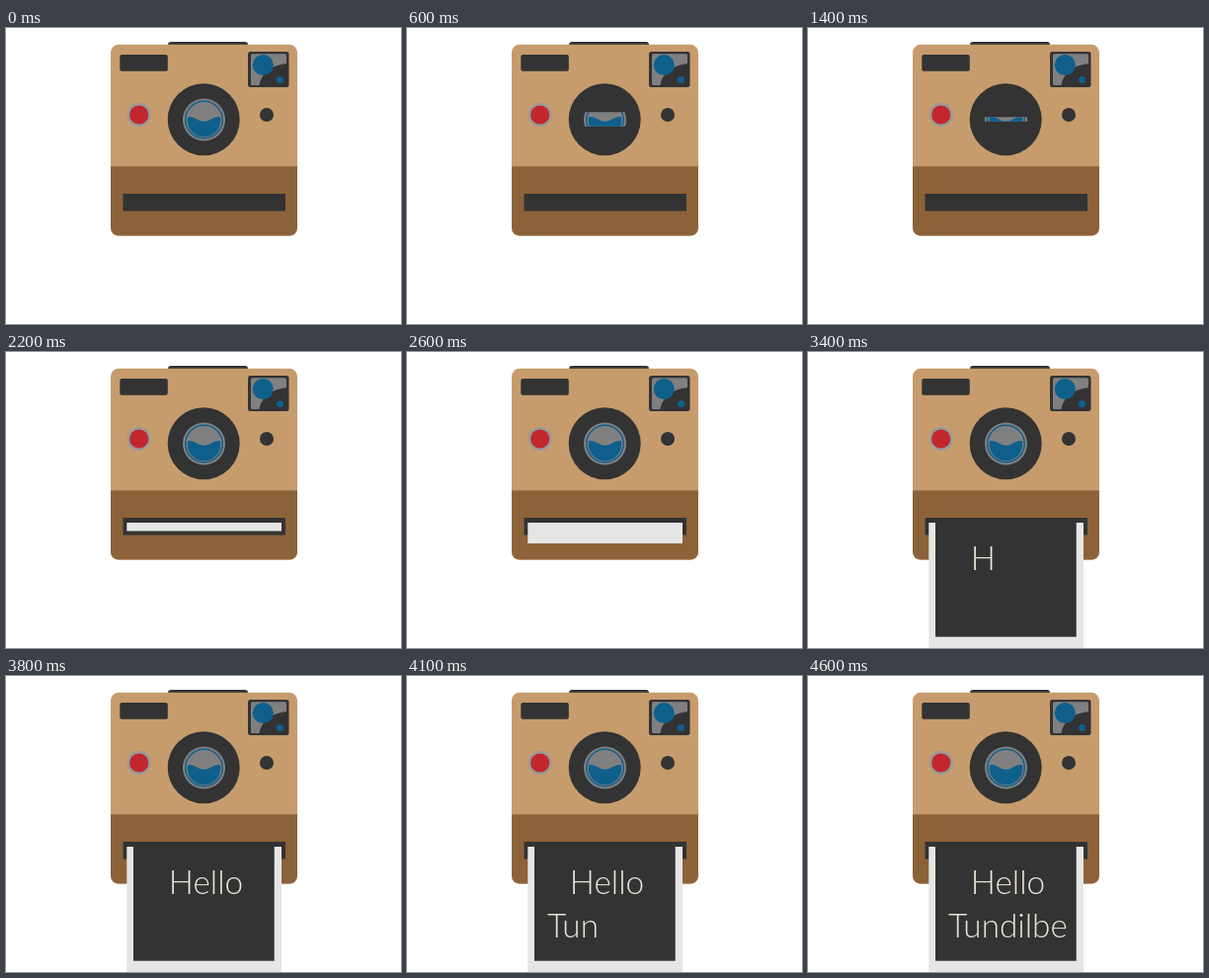
An HTML page that plays this animation: 400 px wide and 300 px high, repeating every 5.6 s.

```html
<!DOCTYPE html>
<html lang="en">
<head>
<meta charset="utf-8">
<title>Instant camera</title>
<style>
  html, body { margin: 0; width: 100%; height: 100%; overflow: hidden; background: #fff; }
  svg { display: block; width: 100vw; height: 100vh; }
  text { font: 300 33.3px Lato, "Open Sans", sans-serif; fill: #ece6da; }
  .dark { fill: #333; }
  .grey { fill: #808080; }
  .blue { fill: #0f5f8c; }
</style>
</head>
<body>
<svg viewBox="0 0 400 300">
  <defs>
    <clipPath id="body"><rect x="106" y="16.8" width="189" height="193.7" rx="8"/></clipPath>
    <clipPath id="shutter"><rect id="gap" x="170" width="61"/></clipPath>
    <clipPath id="exit"><rect x="110" y="173" width="180" height="127"/></clipPath>
  </defs>

  <rect class="dark" x="164" y="14" width="81" height="10" rx="3"/>
  <g clip-path="url(#body)">
    <rect x="106" y="16" width="189" height="195" fill="#c69c6d"/>
    <rect x="106" y="140.3" width="189" height="71" fill="#8c6239"/>
  </g>
  <rect class="dark" x="115.3" y="27" width="48.5" height="16.7" rx="2"/>

  <!-- viewfinder -->
  <rect class="dark" x="245" y="24" width="41.5" height="36" rx="2.5"/>
  <rect class="grey" x="248" y="26.2" width="36" height="31.8" rx="1.5"/>
  <path class="dark" d="M256.3 58.5C258 47 267.500 37.500 284.5 36V58.5Z"/>
  <circle class="blue" cx="260.3" cy="37.5" r="10.5"/>
  <circle class="blue" cx="277.5" cy="52.5" r="3.5"/>

  <!-- buttons -->
  <circle cx="134.7" cy="88" r="12" fill="#999"/>
  <circle cx="134.7" cy="88" r="9.6" fill="#c1272d"/>
  <circle class="dark" cx="264" cy="88" r="7"/>

  <!-- lens -->
  <circle class="dark" cx="200.2" cy="92.8" r="36.5"/>
  <g clip-path="url(#shutter)">
    <circle class="grey" cx="200.5" cy="93" r="21.5"/>
    <circle cx="200.5" cy="93" r="18.7" fill="none" stroke="#0f5f8c" stroke-width="1.4"/>
    <path class="blue" d="M184 90.300C190 88.500 194 94.700 200.500 94.700S211 88.500 217 90.300A16.800 16.800 0 1 1 184 90.300Z"/>
  </g>

  <!-- slot and print -->
  <rect class="dark" x="118.5" y="168" width="164.5" height="17.5"/>
  <g clip-path="url(#exit)">
    <g id="print">
      <rect x="122.3" y="-160" width="156.7" height="160" fill="#e6e6e6"/>
      <rect class="dark" x="129" y="-160" width="142.7" height="136"/>
    </g>
  </g>
  <text id="line1" x="164.8" y="220.7"></text>
  <text id="line2" x="142" y="264.5"></text>
</svg>
<script>
const LOOP = 5600, STEP = 200, LETTER = 100;
const get = id => document.getElementById(id);
const gap = get('gap'), sheet = get('print');
const lines = [
  { el: get('line1'), word: 'Hello', start: 3400 },
  { el: get('line2'), word: 'Tundilbe', start: 3900 }
];

// The shutter closes evenly over six steps, then opens faster over four.
const OPEN = 30, CLOSED = 6, REOPENED = 10, LENS_Y = 92.5;
function aperture(step) {
  if (step < 1 || step >= REOPENED) return OPEN;
  return step <= CLOSED ? 2.45 * (CLOSED - step) : 3.7 * (step - CLOSED) - 1.5;
}

// Lower edge of the print: a slow start, a quick push, a slower finish.
const FEED_START = 11, EDGES = [181.5, 194, 269, 312.7];
function printEdge(step) {
  if (step < FEED_START) return 160;
  const last = EDGES.length - 1;
  const p = Math.min((step - FEED_START) / 2, last);
  const i = Math.min(Math.floor(p), last - 1);
  return EDGES[i] + (EDGES[i + 1] - EDGES[i]) * (p - i);
}

function draw(t) {
  const step = Math.floor(t / STEP);
  const half = aperture(step);
  gap.setAttribute('y', LENS_Y - half);
  gap.setAttribute('height', 2 * half);
  sheet.setAttribute('transform', `translate(0 ${printEdge(step)})`);
  for (const { el, word, start } of lines) {
    const count = Math.max(0, Math.floor((t - start) / LETTER) + 1);
    el.textContent = word.slice(0, count);
  }
}

const begin = performance.now();
function tick(now) {
  draw(Math.max(0, now - begin) % LOOP);
  requestAnimationFrame(tick);
}
draw(0);
requestAnimationFrame(tick);
</script>
</body>
</html>
```
